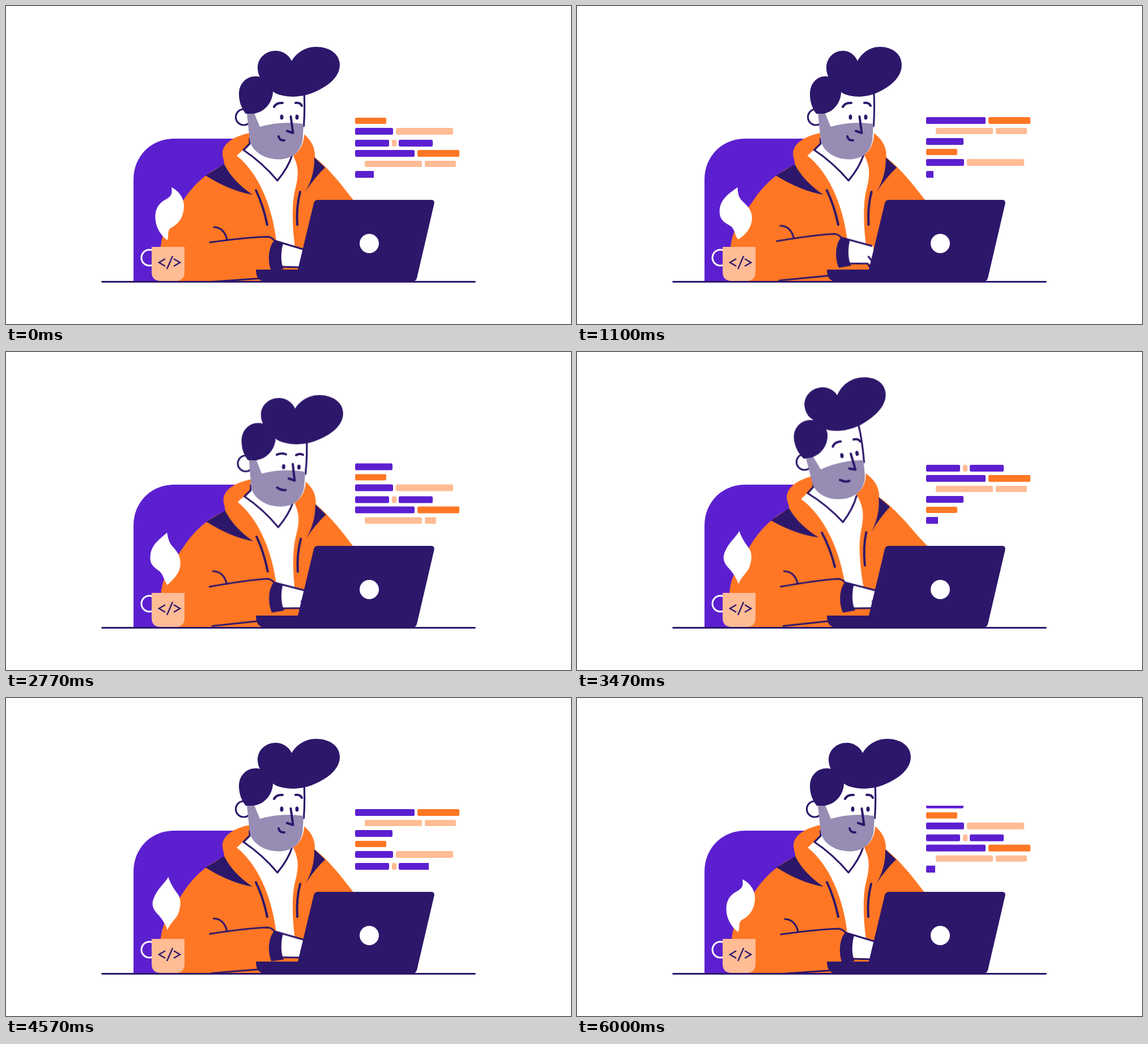
An HTML page without scripts that plays this animation: 997 px wide and 561 px high, repeating every 6030 ms.

```html
<!DOCTYPE html>
<html lang="en">
<head>
<meta charset="utf-8">
<title>Developer at work</title>
<style>
:root { --ink: #2d176b; --violet: #5c1fd0; --orange: #ff7724; --peach: #ffbc95; --beard: #978cb4; }
html, body { margin: 0; width: 100%; height: 100%; overflow: hidden; background: #fff; }
svg { position: absolute; left: 0; top: 0; display: block; }
.ink { fill: var(--ink); }
.violet { fill: var(--violet); }
.orange { fill: var(--orange); }
.peach { fill: var(--peach); }
.white { fill: #fff; }
.line { fill: none; stroke: var(--ink); stroke-width: 3.2; stroke-linecap: round; stroke-linejoin: round; }
.bold { stroke-width: 4; }

/* Poses, one loop of 6.03 s */
.body, .head, .turn, .lag, .arm, .look, .blink, .mouth, .brow-l, .brow-r {
  animation: 6.03s ease-in-out infinite;
}
.body { animation-name: sway; transform-origin: 308px 508px; }
.head { animation-name: nod; transform-origin: 398px 332px; }
.turn { animation-name: turn; --dx: 0px; --sx: 1; }
.lag { animation-name: lag; }
.arm { animation-name: tap; transform-origin: 282px 430px; }
.look { animation-name: look; }
.blink { animation-name: blink; transform-origin: 500px 196px; }
.mouth { animation-name: mouth; }
.brow-l { animation-name: brow-l; }
.brow-r { animation-name: brow-r; }

@keyframes sway {
  0%, 42.6%, 73.5%, 100% { transform: rotate(0deg); }
  45.9%, 52.7%, 62.9%, 66.8% { transform: rotate(.4deg); }
  56.7%, 59% { transform: rotate(-2.7deg); }
}
@keyframes nod {
  0%, 42.6%, 73.5%, 100% { transform: rotate(0deg); }
  45.9%, 52.7%, 62.9% { transform: rotate(1.5deg); }
  56.7%, 59% { transform: rotate(-8.4deg); }
  66.8% { transform: rotate(1.35deg); }
}
@keyframes turn {
  0%, 25%, 28%, 42.6%, 100% { transform: translateX(0) scaleX(1); }
  14%, 19%, 34%, 38% { transform: translateX(var(--dx)) scaleX(var(--sx)); }
}
@keyframes lag {
  0%, 52.7%, 62.9%, 100% { transform: translate(0, 0); }
  56.7%, 59% { transform: translate(var(--lx), var(--ly)); }
}
@keyframes tap {
  0%, 6%, 24%, 30%, 42%, 71%, 77%, 83%, 90%, 96%, 100% { transform: translateX(0) rotate(0deg); }
  3%, 9%, 27%, 39%, 44%, 68%, 74%, 80%, 87%, 93% { transform: translateX(0) rotate(-2.2deg); }
  12%, 21%, 36% { transform: translateX(-7px) rotate(0deg); }
  15%, 18.2%, 33% { transform: translateX(-7px) rotate(-1.6deg); }
  85.1% { transform: translateX(0) rotate(-1deg); }
}
@keyframes look {
  0%, 42.6%, 56.7%, 100% { transform: translateY(0); }
  45.9%, 52.7% { transform: translateY(4px); }
}
@keyframes blink {
  0%, 83.8%, 86.4%, 100% { transform: scaleY(1); }
  84.8%, 85.4% { transform: scaleY(.16); }
}
@keyframes mouth {
  0%, 42.6%, 64%, 100% { d: path("M481 230Q483 238 491 237"); }
  45.9%, 52.7% { d: path("M476 237Q483 242 491 241"); }
  56.7%, 59% { d: path("M477 238Q486 244 493 242"); }
}
@keyframes brow-l {
  0%, 42.6%, 56.7%, 100% { d: path("M473 178Q477 170 488 171"); }
  45.9%, 52.7% { d: path("M474 179Q482 175 490 178"); }
}
@keyframes brow-r {
  0%, 42.6%, 56.7%, 100% { d: path("M511 171Q519 170 522 176"); }
  45.9%, 52.7% { d: path("M508 179Q514 175 520 178"); }
}

/* Steam */
.steam { animation: steam 2.01s infinite; }
@keyframes steam {
  0%, 100% {
    d: path("M292 320C303 325 314 337 314 352C314 375 302 386 290 392C285 396 287 405 285 413C276 408 264 392 263.5 374C263 355 272 346 284 340C294 334 293 328 292 320Z");
    animation-timing-function: cubic-bezier(.12, 0, .39, 0);
  }
  25%, 75% {
    d: path("M287 315C291 326 296 333 303 343C312 354 309 366 304 379C300 388 288 396 285 409C282 397 274 388 268 381C258 370 256 360 265 346C272 335 282 326 287 315Z");
    animation-timing-function: cubic-bezier(.61, 1, .88, 1);
  }
  50% {
    d: path("M283 320C284 328 283 334 289 342C297 350 309 358 309 374C309 394 295 405 285 412C278 407 280 396 272 389C262 383 251 380 251 362C251 340 272 328 283 320Z");
    animation-timing-function: cubic-bezier(.12, 0, .39, 0);
  }
}

/* Code listing */
.code { position: absolute; left: 616px; top: 190px; width: 190px; height: 122px; overflow: hidden; }
.col { position: absolute; left: 0; top: 101px; animation: scroll 3.015s linear infinite; }
.row { position: absolute; left: 0; top: var(--y); display: flex; gap: 4.5px; width: var(--w); height: 11.5px; overflow: hidden; }
.row i { flex: none; width: var(--b); height: 11.5px; border-radius: 2.5px; background: var(--c); }
.v { --c: var(--violet); }
.o { --c: var(--orange); }
.p { --c: var(--peach); }
.r1 { --w: 66px; }
.r2 { --w: 55px; }
.r3 { --w: 173px; }
.r4 { --w: 137px; }
.r5 { --w: 184px; }
.r6 { --w: 161px; left: 17px; }
.type { animation: 3.015s linear infinite; }
.type.r1 { animation-name: type1; }
.type.r2 { animation-name: type2; }
.type.r3 { animation-name: type3; }
.type.r4 { animation-name: type4; }
.type.r5 { animation-name: type5; }
.type.r6 { animation-name: type6; }
.type.next { animation-name: type-next; }
@keyframes type1 { 0% { width: 33px; } 2.2%, 100% { width: var(--w); } }
@keyframes type2 { 0%, 4.3% { width: 0; } 11%, 100% { width: var(--w); } }
@keyframes type3 { 0%, 12.5% { width: 0; } 34.1%, 100% { width: var(--w); } }
@keyframes type4 { 0%, 34.9% { width: 0; } 52.5%, 100% { width: var(--w); } }
@keyframes type5 { 0%, 54.4% { width: 0; } 77.3%, 100% { width: var(--w); } }
@keyframes type6 { 0%, 79% { width: 0; } 95.5%, 100% { width: var(--w); } }
@keyframes type-next { 0%, 98.1% { width: 0; } 100% { width: 33px; } }
@keyframes scroll {
  0%, 2.8% { transform: translateY(0); }
  6.1%, 11.1% { transform: translateY(-18.5px); }
  14.4%, 33.8% { transform: translateY(-37px); }
  36.4%, 52.7% { transform: translateY(-58px); }
  56%, 77.3% { transform: translateY(-76px); }
  80.6%, 96.2% { transform: translateY(-94.5px); }
  100% { transform: translateY(-113px); }
}
</style>
</head>
<body>
<svg width="997" height="561" viewBox="0 0 997 561">
  <clipPath id="desk"><path d="M0 0H997V486H0Z"/></clipPath>

  <path class="violet" d="M225 486V306C225 265 256 234 297 234H405V486Z"/>

  <g clip-path="url(#desk)">
    <g class="body">
      <g class="turn" style="--sx:1.01;transform-origin:460px 0">
        <path class="orange" d="M430 224C404 229 382 242 382 260C382 268 386 275 385 280C358 291 332 314 314 341C300 362 281 386 275 412C271 430 272 450 272 510H650V385L611 340C594 318 572 289 545 267C546 246 535 233 522 223Z"/>
        <path class="ink" d="M385 279L352 299Q395 326 435 333Q400 309 385 279Z"/>
        <path class="ink" d="M544 267L563 285Q545 302 528 328Q545 299 544 267Z"/>
        <path class="white" d="M430 215V243L407 264C438 288 468 340 477 414V432H511C506 400 503 352 510 325C517 298 517 284 506 262L480 240Z"/>
        <path class="line" d="M430 234V243L419 254Q452 276 479 308Q498 285 505 263"/>
        <path class="line bold" d="M441 325Q454 352 461 386M519 328Q512 355 514 386"/>
      </g>
    </g>

    <g class="arm">
      <path class="white" d="M474 413L530 430V462L519 461H487C483 448 486 433 489 419Z"/>
      <path class="ink" d="M474 413C463 424 461 450 468 467L490 464C484 452 485 432 489 419Z"/>
      <path class="line" d="M360 417Q425 408 461 407Q468 407 474 414L527 430M486 460L519 461L524 469M521 449L530 461M367 390Q385 391 390 412M362 486.500L449 480.500"/>
    </g>
  </g>

  <g class="head">
    <g class="lag" style="--lx:2px;--ly:0px">
      <circle class="turn line" style="fill:#fff;--dx:2px" cx="419.5" cy="196" r="14"/>
    </g>
    <g class="turn" style="--sx:.978;transform-origin:428px 0">
      <path class="white" d="M425 150H526V230C522 262 500 270 481 270C450 270 430 250 428 190Z"/>
      <path class="line" d="M525.500 145Q528 175 525.500 212"/>
      <path fill="var(--beard)" d="M425 189H438L448 213Q486 202 525 208L523.500 235C520 260 502 270.500 481 270.500C452 270 433 254 430 236Z"/>
    </g>
    <g class="lag" style="--lx:2px;--ly:-1.5px">
      <g class="turn" style="--dx:-4px">
        <path class="line bold brow-l" d="M473 178Q477 170 488 171"/>
        <path class="line bold brow-r" d="M511 171Q519 170 522 176"/>
        <g class="look">
          <g class="ink blink">
            <ellipse cx="486.500" cy="196" rx="3" ry="4.500"/>
            <ellipse cx="513.500" cy="196" rx="3" ry="4.500"/>
          </g>
        </g>
        <path class="line bold" d="M502.500 195L506.500 224L496 220.500"/>
        <path class="line bold mouth" d="M481 230Q483 238 491 237"/>
      </g>
    </g>
    <g class="lag" style="--lx:-2px;--ly:0px">
      <path class="ink turn" style="--sx:.92;transform-origin:411px 0" d="M423 190C415 180 411 168 411 155C411 137 424 124 441 124C458 124 471 138 471 153C469 172 456 187 437 190Z"/>
    </g>
    <g class="lag" style="--lx:-8px;--ly:-9px">
      <path class="ink turn" style="--dx:-4px;--sx:.917;transform-origin:444px 0" d="M471 151C478 157 495 160 508 160C530 159 548 152 566 140C580 130 589 118 589 104C589 84 570 72 547 72C528 72 512 83 504 97C499 86 488 79 476 79C458 79 444 92 444 109C444 116 446 122 449 127Z"/>
    </g>
  </g>

  <path class="ink" d="M441 465H515L543 348Q544.500 342 550 342H750Q757 342 755.500 349L725 480Q723 486 717 486H458Q441 486 441 465Z"/>
  <circle class="white" cx="641" cy="419" r="17"/>

  <path class="white steam" d="M292 320C303 325 314 337 314 352C314 375 302 386 290 392C285 396 287 405 285 413C276 408 264 392 263.500 374C263 355 272 346 284 340C294 334 293 328 292 320Z"/>
  <circle cx="253" cy="444" r="14" fill="none" stroke="#fff" stroke-width="3"/>
  <path class="peach" d="M257 425H315V469Q315 485 299 485H273Q257 485 257 469Z"/>
  <path class="line" style="stroke-width:2.4;stroke-linecap:butt;stroke-linejoin:miter" d="M281 446L270 452.500L281 459M294 441L284 464M296 446L307 452.500L296 459"/>
  <path class="line" style="stroke-width:3;stroke-linecap:butt" d="M168.500 486.500H828.500"/>
</svg>

<div class="code"><div class="col">
  <div class="row r2" style="--y:-94.5px"><i class="o" style="--b:55px"></i></div>
  <div class="row r3" style="--y:-76px"><i class="v" style="--b:67px"></i><i class="p" style="--b:101px"></i></div>
  <div class="row r4" style="--y:-55px"><i class="v" style="--b:60px"></i><i class="p" style="--b:8px"></i><i class="v" style="--b:60px"></i></div>
  <div class="row r5" style="--y:-37px"><i class="v" style="--b:105px"></i><i class="o" style="--b:74px"></i></div>
  <div class="row r6" style="--y:-18.5px"><i class="p" style="--b:101px"></i><i class="p" style="--b:55px"></i></div>
  <div class="row r1 type" style="--y:0px"><i class="v" style="--b:66px"></i></div>
  <div class="row r2 type" style="--y:18.5px"><i class="o" style="--b:55px"></i></div>
  <div class="row r3 type" style="--y:37px"><i class="v" style="--b:67px"></i><i class="p" style="--b:101px"></i></div>
  <div class="row r4 type" style="--y:58px"><i class="v" style="--b:60px"></i><i class="p" style="--b:8px"></i><i class="v" style="--b:60px"></i></div>
  <div class="row r5 type" style="--y:76px"><i class="v" style="--b:105px"></i><i class="o" style="--b:74px"></i></div>
  <div class="row r6 type" style="--y:94.5px"><i class="p" style="--b:101px"></i><i class="p" style="--b:55px"></i></div>
  <div class="row r1 type next" style="--y:113px"><i class="v" style="--b:66px"></i></div>
</div></div>
</body>
</html>
```
